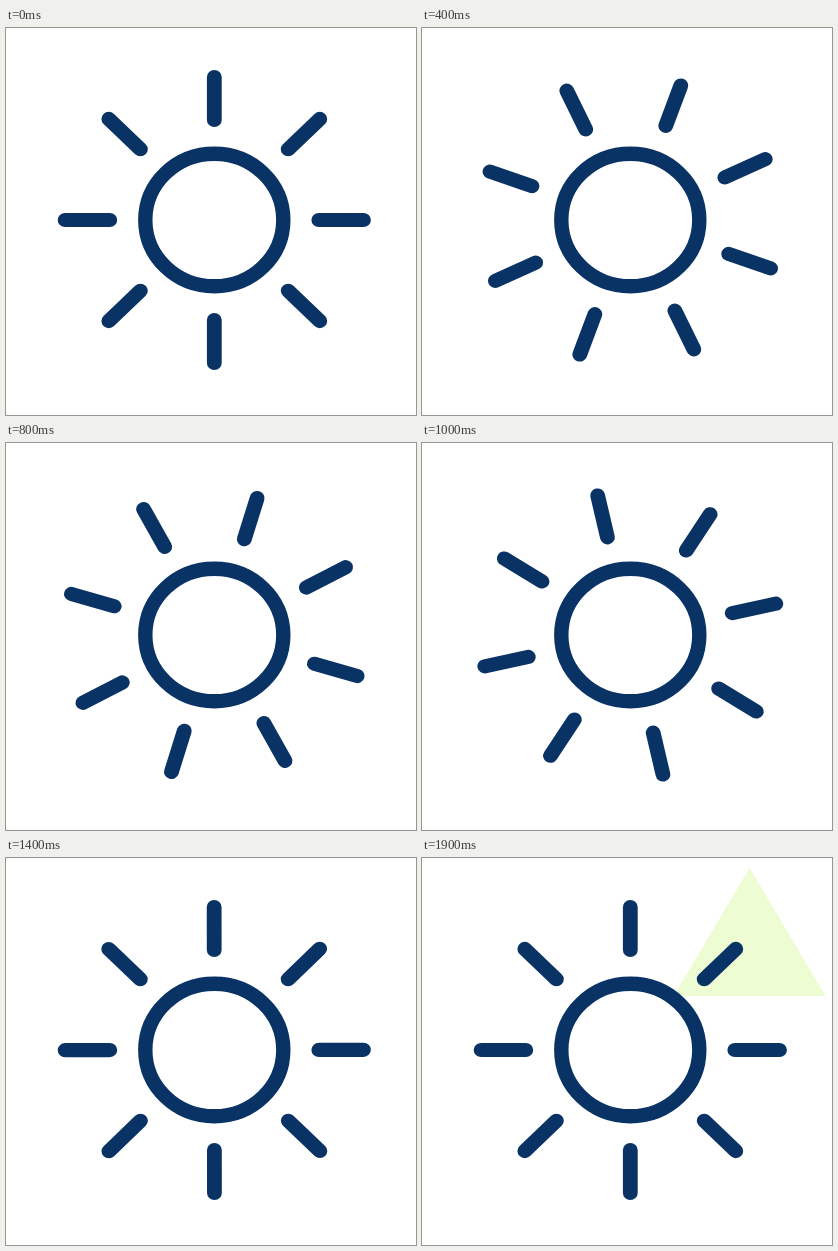
An HTML page for the animation above (2 s loop, 410 px wide and 387 px high).

```html
<!DOCTYPE html>
<html lang="en">
<head>
<meta charset="utf-8">
<title>Sun</title>
<style>
  html, body { margin: 0; width: 100%; height: 100%; overflow: hidden; background: #fff; }
  svg { display: block; width: 100%; height: 100%; }
</style>
</head>
<body>
<svg viewBox="0 0 410 387">
  <path id="triangle" d="M0-68.3L76 59.7H-76Z" fill="#edfcd2"/>
  <g fill="none" stroke="#0a3365" stroke-linecap="round">
    <ellipse cx="208.3" cy="192" rx="69" ry="66.3" stroke-width="14.4"/>
    <g transform="translate(208.3 192) scale(1 .958)">
      <path id="rays" stroke-width="14.8"/>
    </g>
  </g>
</svg>
<script>
const LOOP = 2000, STEP = 100;
const SPIN = { from: 0, to: 1430 };
const GROW = { from: 1400, to: 1800 };

const rays = document.getElementById('rays');
const triangle = document.getElementById('triangle');

rays.setAttribute('d', Array.from({ length: 8 }, (_, i) => {
  const c = Math.cos(i * Math.PI / 4), s = Math.sin(i * Math.PI / 4);
  return `M${104.5 * c} ${104.5 * s}L${149.2 * c} ${149.2 * s}`;
}).join(''));

// Cubic bezier (.351, 0, .504, 1), solved for x by bisection
function ease(x) {
  if (x <= 0) return 0;
  if (x >= 1) return 1;
  let lo = 0, hi = 1;
  for (let i = 0; i < 24; i++) {
    const s = (lo + hi) / 2, r = 1 - s;
    if (3 * s * r * r * .351 + 3 * s * s * r * .504 + s ** 3 < x) lo = s;
    else hi = s;
  }
  return lo * lo * (3 - 2 * lo);
}

const progress = (t, { from, to }) => ease((t - from) / (to - from));

function draw(ms) {
  const t = Math.floor(ms % LOOP / STEP) * STEP;
  rays.setAttribute('transform', `rotate(${90 * progress(t, SPIN)})`);
  triangle.setAttribute('transform', `translate(327.6 78.3) scale(${progress(t, GROW)})`);
}

const start = performance.now();
function tick() {
  draw(performance.now() - start);
  requestAnimationFrame(tick);
}
tick();
</script>
</body>
</html>
```
